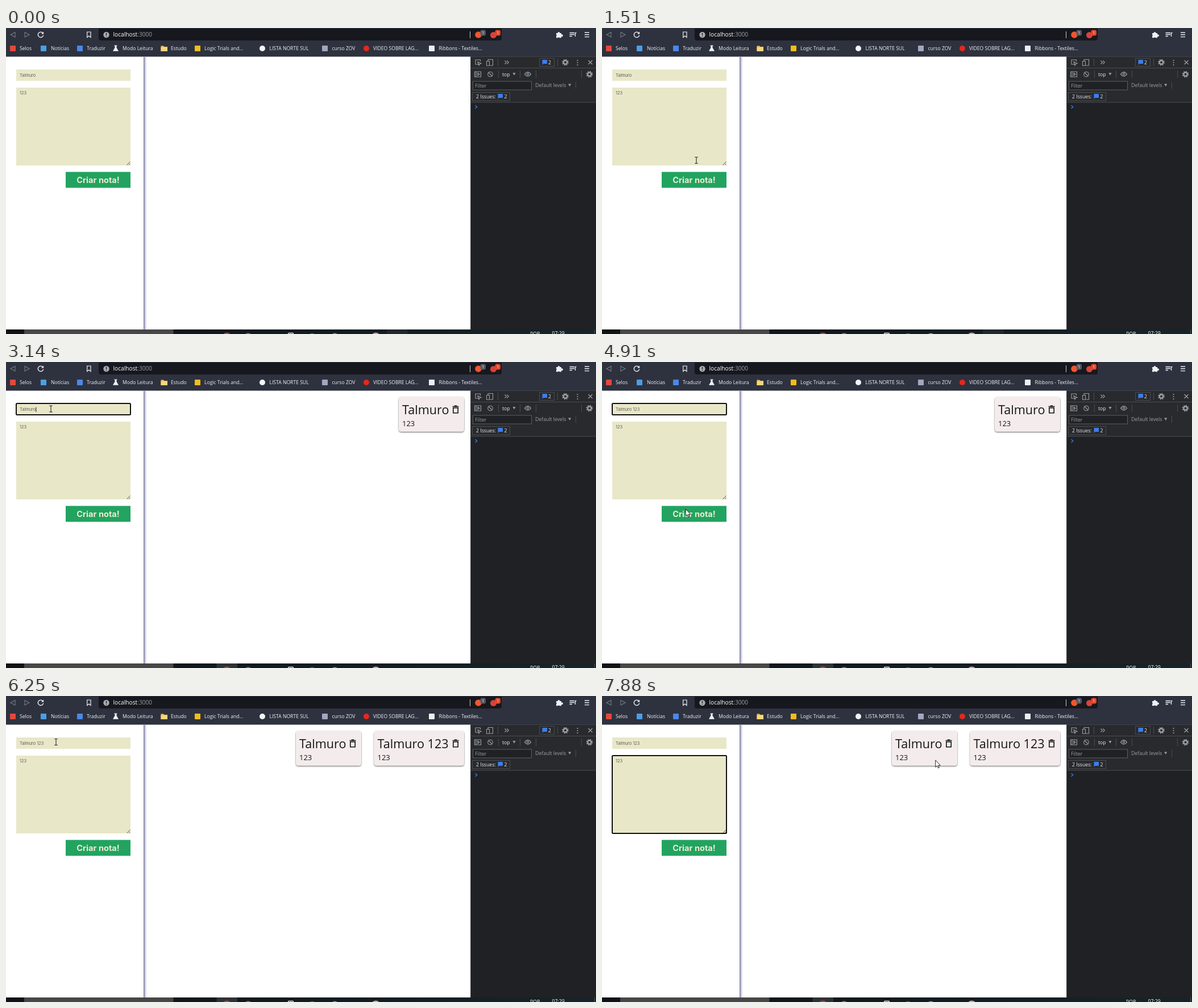
Write an HTML page that moves like this. It is 1038 px wide and 539 px high and loops after 8000 ms.

```html
<!DOCTYPE html>
<html lang="pt">
<head>
<meta charset="utf-8">
<title>Notas</title>
<style>
  html, body { margin: 0; width: 100%; height: 100%; overflow: hidden; background: #fff; }
  svg { display: block; width: 1038px; height: 539px; }
  text { font-family: "Open Sans", "Noto Sans", sans-serif; white-space: pre; }
  .mark { font-size: 8.6px; fill: #f2f3f5; }
  .dev { font-size: 8.7px; fill: #e8eaed; }
  .field { font-family: Inter, sans-serif; font-size: 7.4px; fill: #5f5f55; }
  .line { fill: none; stroke: #9aa0a6; stroke-width: 1.1; }
  .sep { stroke: #4a4c50; fill: none; }
  .ring { fill: none; stroke: #101010; stroke-width: 2; }
</style>
</head>
<body>
<svg viewBox="0 0 1038 539">
  <defs>
    <linearGradient id="edge">
      <stop offset="0" stop-color="#74759f"/>
      <stop offset=".25" stop-color="#a3a4c2"/>
      <stop offset=".6" stop-color="#e4e4ee"/>
      <stop offset="1" stop-color="#fff"/>
    </linearGradient>
    <linearGradient id="bar">
      <stop offset="0" stop-color="#0c1216"/>
      <stop offset="1" stop-color="#16242a"/>
    </linearGradient>
    <filter id="drop" x="-10%" y="-15%" width="120%" height="135%">
      <feDropShadow dx="0" dy="1.3" stdDeviation="1.3" flood-color="#000" flood-opacity=".6"/>
    </filter>
    <g id="bin" fill="none" stroke="#111" stroke-width="1.6">
      <path d="M-5.500-5H5.500M-2.300-6.200H2.300M-4.200-2.800V6.200H4.200V-2.800Z"/>
    </g>
    <g id="gear" fill="none" stroke="#9aa0a6">
      <circle r="3.2" stroke-width="2.4"/>
      <circle r="5" stroke-width="1.6" stroke-dasharray="2 1.927"/>
    </g>
    <path id="chat" d="M-4-4.500H4.500V2.500H-2L-4 4.500Z" fill="#3b7ded"/>
  </defs>

  <rect width="1038" height="539" fill="#fff"/>

  <!-- browser bar -->
  <rect width="1038" height="50.500" fill="#2e323f"/>
  <path d="M163 1H872V18Q872 22 868 22H167Q163 22 163 18Z" fill="#17181e"/>
  <g fill="none" stroke="#767a86" stroke-width="1.1">
    <path d="M16 7.500V16L8 11.800ZM33 7.500V16L41 11.800Z"/>
  </g>
  <g fill="none" stroke="#f0f1f4" stroke-width="1.4">
    <path d="M64.800 9A4.700 4.700 0 1 0 65.700 12.500"/>
    <path d="M142.700 7H149V16.500L145.850 14L142.700 16.500Z" stroke-width="1.2"/>
    <path d="M991.500 8.500H1000M991.500 11.500H1000M991.500 14.500H996M1001.500 8V15M1001.500 8.500H1003.500"/>
    <path d="M1018 8H1026M1018 11.800H1026M1018 15.600H1026"/>
  </g>
  <path d="M66.200 6.500V10.600H62Z" fill="#f0f1f4"/>
  <circle cx="176.500" cy="12" r="5.200" fill="#a9acb4"/>
  <path d="M176.500 8.800V12.800M176.500 14V15.300" stroke="#17181e" stroke-width="1.4"/>
  <text x="188.500" y="15.300" font-size="10.200" fill="#fff">localhost<tspan fill="#9b9ea7">:3000</tspan></text>
  <path d="M816.500 6V18" stroke="#c9cbd1"/>
  <circle cx="831" cy="12" r="5.800" fill="#f2552c"/>
  <circle cx="857.500" cy="12.500" r="5.500" fill="#d9423a"/>
  <rect x="834.500" y="3.500" width="9.500" height="10" rx="3" fill="#565a66"/>
  <rect x="860.500" y="3.500" width="9.500" height="10" rx="3" fill="#e2482d"/>
  <text x="837.300" y="11.200" font-size="7" fill="#fff">1</text>
  <text x="863.300" y="11.200" font-size="7" fill="#fff">1</text>
  <path d="M968 9H970.500A2 2 0 1 1 974.500 9H977V11.500A2 2 0 1 1 977 15V17.300H973.800A1.700 1.700 0 0 0 970.800 17.300H968V14.300A1.700 1.700 0 0 0 968 11.500Z" fill="#f0f1f4"/>

  <!-- bookmarks -->
  <g id="marks"></g>
  <path d="M190.500 30.500H195.500V31.700H194.500V34.500L198 40.800H188L191.500 34.500V31.700H190.500Z" fill="#f0f1f4"/>
  <path d="M272.500 31.500H277L278.500 33H284V41H272.500Z" fill="#eebf55"/>
  <path d="M272.500 34H284V41H272.500Z" fill="#fad579"/>

  <!-- side panel -->
  <rect x="242" y="51" width="6.500" height="480" fill="url(#edge)"/>
  <g fill="#e8e7c8">
    <rect x="18" y="73" width="201" height="20"/>
    <rect x="18" y="105" width="201" height="137"/>
  </g>
  <path d="M212.500 241.500L218.500 235.500M216 241.500L218.500 239" stroke="#55554a" fill="none"/>
  <text id="title" class="field" x="24" y="86.300"></text>
  <text class="field" x="24" y="117.400">123</text>
  <rect id="caret" y="79.500" width="1" height="8.500" fill="#222"/>
  <rect id="ring1" class="ring" x="18" y="73" width="201" height="20" rx="1.500"/>
  <rect id="ring2" class="ring" x="18" y="105" width="201" height="137" rx="1.500"/>
  <g id="button">
    <rect x="105" y="253.500" width="114" height="28" fill="#22a360"/>
    <text x="162" y="272.500" text-anchor="middle" font-size="14.600" font-weight="700" fill="#eeecd0" style="font-family:Inter,sans-serif">Criar nota!</text>
  </g>

  <!-- notes -->
  <g id="cards"></g>

  <!-- developer tools -->
  <rect x="817" y="50.500" width="221" height="481" fill="#202124"/>
  <rect x="818" y="50.500" width="220" height="80.500" fill="#292a2d"/>
  <path class="sep" d="M818 70.500H1038M818 131H1038M817.500 51V531M865.500 54V67M970.500 54V67M866.500 75V88M904.500 75V88M932.500 75V88M1012.500 75V88M1002.500 95V107"/>
  <g class="line">
    <path d="M833 64H826V56H834.500V59M830 59.500L836 62.500L833.200 63.300L832 66Z"/>
    <path d="M848 58V55.500H856.500V66H851.500M845.500 58.500H850.500V66.300H845.500Z"/>
    <path d="M877.500 57.500L880.500 60.500L877.500 63.500M881.300 57.500L884.300 60.500L881.300 63.500"/>
    <path d="M1024.500 57L1031.500 64M1031.500 57L1024.500 64" stroke-width="1.300"/>
    <path d="M824.500 77H835.500V86H824.500ZM827 77V86M830 79.300L833.300 81.500L830 83.700Z"/>
    <circle cx="852" cy="81.500" r="4.300"/><path d="M849 78.500L855 84.500"/>
    <path d="M912.500 81.300Q918 74 923.500 81.300Q918 88.500 912.500 81.300Z"/>
    <circle cx="918" cy="81.300" r="1.700"/>
  </g>
  <g fill="#9aa0a6">
    <circle cx="1005.500" cy="57" r="1.100"/><circle cx="1005.500" cy="61" r="1.100"/><circle cx="1005.500" cy="65" r="1.100"/>
    <path d="M891.500 79H896.500L894 83.500ZM989.200 98.500H994.200L991.700 103Z"/>
  </g>
  <use href="#gear" x="984" y="60.500"/>
  <use href="#gear" x="1026.500" y="81.500"/>
  <rect class="sep" x="938.500" y="53.500" width="26" height="14"/>
  <rect class="sep" x="820.500" y="113.500" width="66" height="14.500"/>
  <rect x="821.500" y="94" width="103" height="15" fill="#202124" stroke="#5b5e63"/>
  <use href="#chat" x="947.500" y="60.500"/>
  <use href="#chat" x="869.500" y="120.500"/>
  <text class="dev" x="954" y="63.800">2</text>
  <text class="dev" x="873" y="84.500">top</text>
  <text class="dev" x="825" y="105" style="fill:#9aa0a6">Filter</text>
  <text class="dev" x="931" y="104.300" style="fill:#9aa0a6">Default levels</text>
  <text class="dev" x="827" y="124.300">2 Issues:</text>
  <text class="dev" x="876.500" y="124.300">2</text>
  <path d="M825.500 136.300L828.800 139L825.500 141.700" fill="none" stroke="#367cf1" stroke-width="1.300"/>

  <!-- taskbar -->
  <rect y="531" width="1038" height="8" fill="url(#bar)"/>
  <rect x="32" y="531" width="262.500" height="8" fill="#474747"/>
  <rect id="tab" y="531" width="36.500" height="8"/>
  <circle cx="388.500" cy="545" r="8.500" fill="#d8341f"/>
  <circle cx="426" cy="545" r="7.800" fill="#e2562f"/>
  <rect x="496.500" y="537.500" width="9" height="6" rx="1" fill="none" stroke="#f0f0f0" stroke-width="1.300"/>
  <circle cx="538.500" cy="545" r="7.600" fill="#2a62d8"/>
  <circle cx="578.500" cy="545" r="7.600" fill="#ef8a2c"/>
  <circle cx="650.500" cy="545" r="8.500" fill="#e89a80"/>
  <text x="922" y="541.500" font-size="8.700" fill="#fff">POR</text>
  <text x="960.500" y="541" font-size="8.700" fill="#fff">07:29</text>
  <path d="M1035.500 531V539" stroke="#4a5054"/>

  <!-- pointer -->
  <path id="arrow" d="M-.3 0V12.300L2.600 9.800L4.500 14L6.300 13.200L4.500 9.200H8.200Z" fill="#fff" stroke="#111" stroke-width=".9"/>
  <path id="beam" d="M-2.800-5.500H-.8L0-4.900L.8-5.500H2.800M0-5V5M-2.800 5.500H-.8L0 4.900L.8 5.500H2.800" fill="none" stroke="#222" stroke-width="1.100"/>
</svg>
<script>
const LOOP = 8000;
const NAME = "Talmuro";
const $ = id => document.getElementById(id);
const show = (el, on) => el.setAttribute("visibility", on ? "visible" : "hidden");
const within = (t, a, b) => t >= a && t < b;

// label, text x, icon x, icon colour, round icon
const marks = [
  ["Selos", 24, 12, "#e2493c"],
  ["Notícias", 79, 66, "#4b9fe6"],
  ["Traduzir", 142, 130, "#4a88e8"],
  ["Modo Leitura", 205],
  ["Estudo", 290],
  ["Logic Trials and...", 349, 337, "#f3bd1d"],
  ["LISTA NORTE SUL", 463.500, 451, "#f4f5f7", true],
  ["curso ZOV", 573.500, 561, "#a4a6bd"],
  ["VIDEO SOBRE LAG...", 646, 634, "#e8271c", true],
  ["Ribbons - Textiles...", 761.500, 749, "#eceef0"]
];
$("marks").innerHTML = marks.map(([label, x, ix, color, round]) => {
  const icon = color
    ? `<rect x="${ix - 5}" y="31" width="10" height="10" rx="${round ? 5 : 1}" fill="${color}"/>` : "";
  return `${icon}<text class="mark" x="${x}" y="39">${label}</text>`;
}).join("");

function card(x, w, title) {
  return `<g transform="translate(${x} 61)">
    <rect width="${w}" height="61.500" rx="4.500" fill="#f4ecec" filter="url(#drop)"/>
    <text x="6" y="31" font-size="21.600" fill="#151515">${title}</text>
    <text x="6" y="51.800" font-size="13" fill="#151515">123</text>
    <use href="#bin" x="${w - 15}" y="22.500"/></g>`;
}
$("cards").innerHTML = card(691, 115, NAME) + card(647.500, 158.500, NAME + " 123");
const [first, second] = $("cards").children;

// Each move: start, end, number of steps, waypoints [progress, x, y]
const moves = [
  [70, 460, 7, [[0, 1010, 548], [.14, 979, 528], [.5, 640, 420], [.8, 330, 315], [1, 218, 286]]],
  [610, 1370, 12, [[0, 218, 286], [.17, 208, 291], [.33, 150, 215], [.6, 54, 92], [.75, 80, 130], [1, 152, 215]]],
  [1440, 2070, 10, [[0, 152, 215], [.2, 166, 233], [.5, 152, 262], [1, 150, 262]]],
  [2460, 2940, 8, [[0, 150, 262], [.4, 95, 165], [.75, 63, 96], [1, 79, 82.500]]],
  [4490, 4970, 8, [[0, 79, 82.500], [.4, 103, 140], [.75, 138, 228], [.875, 147.500, 259], [1, 146.500, 258]]],
  [5630, 6250, 10, [[0, 146.500, 258], [.3, 124, 205], [.7, 94, 108], [1, 88, 81]]],
  [6390, 7130, 10, [[0, 88, 81], [.3, 87, 78], [.7, 80.500, 121.500], [1, 82, 139]]],
  [7200, 7880, 11, [[0, 82, 139], [.18, 82, 139], [.45, 230, 150], [.8, 510, 122], [1, 587, 113]]]
];

function along(points, p) {
  const i = Math.max(1, points.findIndex(q => q[0] >= p - 1e-9));
  const [a, b] = [points[i - 1], points[i]];
  const u = Math.min(1, (p - a[0]) / (b[0] - a[0]));
  return [a[1] + (b[1] - a[1]) * u, a[2] + (b[2] - a[2]) * u];
}

function pointer(t) {
  const move = moves.filter(m => t >= m[0]).pop();
  if (!move) return null;
  const [start, end, n, points] = move;
  const u = Math.min(1, (t - start) / (end - start));
  const step = Math.floor(u * (n - 1) + 1e-6);
  return along(points, (step + 1) / n);
}

const inside = (p, x0, y0, x1, y1) => !!p && within(p[0], x0, x1) && within(p[1], y0, y1);

function typed(t) {
  const count = [3600, 3870, 4020, 4290].filter(k => t >= k).length;
  return NAME + " 123".slice(0, count);
}

function draw(t) {
  const title = $("title");
  const value = typed(t);
  if (title.textContent !== value) title.textContent = value;
  $("caret").setAttribute("x", 24.3 + title.getComputedTextLength());
  show($("caret"), within(t, 3140, 4790) || within(t, 6390, 6890));
  show($("ring1"), within(t, 3090, 5170) || within(t, 6390, 7200));
  show($("ring2"), t >= 7200);

  // the button reacts slightly after the pointer
  const hover = inside(pointer(t - 60), 105, 253, 219, 282);
  $("button").setAttribute("opacity", hover ? .7 : 1);

  show(first, t >= 1930);
  show(second, t >= 5300);
  first.setAttribute("transform", `translate(${t < 5300 ? 691 : 510} 61)`);

  const active = t >= 1860;
  $("tab").setAttribute("x", active ? 370.5 : 670);
  $("tab").setAttribute("fill", active ? "#2b3336" : "#20282d");

  const pos = pointer(t);
  const text = inside(pos, 18, 73, 219, 93) || inside(pos, 18, 105, 219, 242);
  show($("arrow"), pos && !text);
  show($("beam"), text);
  if (pos) for (const id of ["arrow", "beam"]) $(id).setAttribute("transform", `translate(${pos})`);
}

function tick() {
  draw(performance.now() % LOOP);
  requestAnimationFrame(tick);
}
tick();
</script>
</body>
</html>
```
